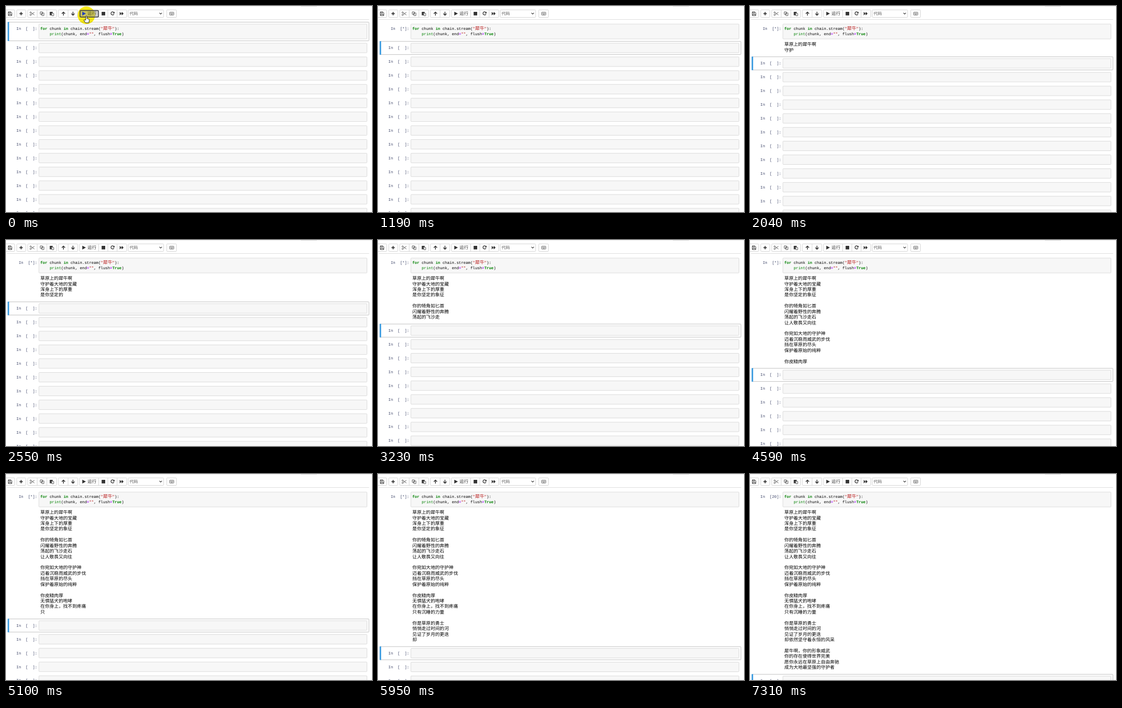
An HTML page that plays this animation: 690x388 px, repeating every 7.82 s.

```html
<!DOCTYPE html>
<html lang="zh-CN">
<head>
<meta charset="utf-8">
<style>
html, body { margin: 0; width: 100%; height: 100%; overflow: hidden; background: #fff; }
svg { display: block; width: 690px; height: 388px; }
text { white-space: pre; text-rendering: geometricPrecision; }
.mono { font: 7.3px "Liberation Mono", monospace; }
.cjk, .out { font-family: "Noto Sans CJK SC", "Noto Sans CJK", sans-serif; }
.out { font-size: 8.6px; }
.prompt { fill: #3c4468; text-anchor: end; }
.input { fill: #f7f7f7; stroke: #d4d4d4; stroke-width: .8; }
.btn { fill: #fff; stroke: #ccc; stroke-width: .8; }
.icon { fill: #333; }
.line { fill: none; stroke: #333; stroke-width: 1; }
.kw { fill: #008000; font-weight: bold; }
.fn { fill: #008000; }
.op { fill: #a2f; font-weight: bold; }
.str { fill: #ba2121; }
</style>
</head>
<body>
<svg viewBox="0 0 690 388">
  <path d="M0 .5H690" stroke="#eee"/>
  <path d="M556 0H586" stroke="#bbb"/>
  <path d="M2 25.4H684.5" stroke="#ddd"/>
  <g id="buttons"></g>

  <g class="line">
    <path d="M4.3 11H9L11 13V18H4.3ZM5.8 11V13.3H8.7V11M5.8 18V15.5H9.5V18" stroke-width=".9"/>
    <path d="M28.5 11.2V17.4M25.4 14.3H31.6" stroke-width="1.7"/>
    <path d="M47.5 12.8L53.6 17M47.5 16L53.6 11.8" stroke="#555" stroke-width=".9"/>
    <g stroke="#555" stroke-width=".9"><circle cx="46.4" cy="12.2" r="1.3"/><circle cx="46.4" cy="16.7" r="1.3"/></g>
    <path d="M64.5 11H68.5V15.5H64.5ZM67.5 13H71.5V18H67.5Z" fill="#fff" stroke-width=".8"/>
    <path d="M108.3 18V11.6M105.2 14.5L108.3 11.4L111.4 14.5M126.3 10.8V17.2M123.2 14.3L126.3 17.4L129.4 14.3" stroke-width="1.4"/>
    <path d="M203.4 12.2A3 3 0 1 0 203.6 15.4" stroke-width="1.3"/>
    <path d="M289.4 13L291.6 15.3L293.8 13" stroke-width="1.1"/>
    <rect x="308.4" y="11.7" width="8" height="5.4" rx=".6" stroke="#555" stroke-width=".8"/>
    <path d="M309.7 13.3H315.2M309.7 14.6H315.2" stroke="#555" stroke-width=".8" stroke-dasharray="1 .5"/>
    <path d="M310.6 15.9H314.3" stroke="#555" stroke-width=".8"/>
  </g>
  <g class="icon">
    <path d="M82.5 11H88V13.3H85.7V17.5H82.5Z"/>
    <path d="M86.3 14H90V18.2H86.3Z" fill="#fff" stroke="#333" stroke-width=".8"/>
    <rect x="180.3" y="11" width="6.7" height="6.7"/>
    <path d="M204.6 10.5V14H201.2Z"/>
    <path d="M214.4 11L218 14.3V11L221.8 14.3L218 17.7V14.3L214.4 17.7Z"/>
  </g>
  <text class="cjk" x="233" y="17.2" font-size="7.8" fill="#555">代码</text>

  <rect id="frame" x="3.4" width="680.8" rx="1" fill="#fff" stroke="#b4b4b4" stroke-width=".8"/>
  <rect id="bar" x="3" width="3" fill="#48a2e2"/>
  <rect class="input" x="62" y="34" width="618.5" height="28" rx="1"/>
  <text id="state" class="mono prompt" x="59" y="45"></text>
  <g class="mono">
    <text x="64.7" y="45"><tspan class="kw">for</tspan> chunk <tspan class="kw">in</tspan> chain.stream(<tspan class="str">"<tspan class="cjk" font-size="8.7">犀牛</tspan>"</tspan>):</text>
    <text x="64.7" y="55.1">    <tspan class="fn">print</tspan>(chunk, end<tspan class="op">=</tspan><tspan class="str">""</tspan>, flush<tspan class="op">=</tspan><tspan class="kw">True</tspan>)</text>
  </g>
  <g id="poem" class="out"></g>
  <g id="cells"></g>

  <circle id="glow" r="16.5" fill="#f8ea18" style="mix-blend-mode:multiply"/>
  <rect id="pressed" x="139.6" y="8.4" width="34.8" height="12.4" rx="2" fill="#999" fill-opacity=".5" stroke="#3c3c46" stroke-width="1.5"/>
  <path id="play" d="M143.8 10.8L150.6 14.3L143.8 17.9Z"/>
  <text id="run" class="cjk" x="153.6" y="17.4" font-size="8.4">运行</text>
  <g id="pointer" fill="#fff" stroke="#111" stroke-width=".9">
    <path id="hand" d="M-1.2 9V2.6Q-1.2 1.2 0 1.2Q1.2 1.2 1.2 2.6V6.2L4.6 7.2Q5.6 7.6 5.6 8.6L4.6 14.2H-1.4L-4.6 9.8Q-4.6 8.2-3.2 8.6Z"/>
    <path id="arrow" d="M0 0V10L2.4 7.8L4 11.4L5.6 10.7L4 7.2H7.2Z"/>
  </g>
</svg>
<script>
const LOOP = 7820, STEP = 170;
const LINE = 10.43, CELL = 25.92;
const poem = `草原上的犀牛啊
守护着大地的宝藏
浑身上下的厚重
是你坚定的象征

你的犄角如匕首
闪耀着野性的奔腾
荡起的飞沙走石
让人敬畏又向往

你宛如大地的守护神
迈着沉稳而威武的步伐
挡在草原的尽头
保护着原始的纯粹

你皮糙肉厚
无惧猛犬的咆哮
在你身上，找不到疼痛
只有沉睡的力量

你是草原的勇士
悄悄走过时间的河
见证了岁月的更迭
却依然坚守着永恒的风采

犀牛啊，你的形象威武
你的存在使得世界完美
愿你永远在草原上自由奔驰
成为大地最坚强的守护者`;
// Each token is one character plus any line breaks before it.
const tokens = poem.match(/\n*[^\n]/g);
// Time in ms and characters written by then.
const pace = [[2040, 9], [2550, 27], [3910, 72], [5100, 115], [5950, 145], [7310, tokens.length]];

const $ = id => document.getElementById(id);
const set = (id, attrs) => {
  for (const k in attrs) $(id).setAttribute(k, attrs[k]);
};
const show = (id, on) => set(id, { display: on ? 'inline' : 'none' });

// Button groups: the x of every edge.
const groups = [[-2, 16.4], [20.3, 37.3], [41, 58.8, 77, 95.3], [98.8, 117, 135.3],
  [138.6, 174.6, 192, 209.4, 227.6], [230.4, 297], [303, 321.4]];
$('buttons').innerHTML = groups.map(g => {
  const w = g[g.length - 1] - g[0];
  return `<rect class="btn" x="${g[0]}" y="7.3" width="${w}" height="14.2" rx="1.2"/>` +
    g.slice(1, -1).map(x => `<path class="btn" d="M${x} 7.3V21.5"/>`).join('');
}).join('');

$('cells').innerHTML = Array.from({ length: 13 }, (_, i) => {
  const y = 70 + i * CELL;
  return `<rect class="input" x="62" y="${y}" width="618.5" height="18" rx="1"/>
    <text class="mono prompt" x="59" y="${y + 11.4}">In  [  ]:</text>`;
}).join('');

const lines = poem.split('\n').map((_, i) => {
  const el = document.createElementNS('http://www.w3.org/2000/svg', 'text');
  el.setAttribute('x', 64.8);
  el.setAttribute('y', 75.1 + i * LINE);
  return $('poem').appendChild(el);
});

function written(t) {
  if (t < pace[0][0]) return 0;
  for (let i = 1; i < pace.length; i++) {
    const [t0, n0] = pace[i - 1], [t1, n1] = pace[i];
    if (t <= t1) return Math.round(n0 + (n1 - n0) * (t - t0) / (t1 - t0));
  }
  return tokens.length;
}

function drawCursor(t) {
  const u = Math.min(1, Math.max(0, (t - 340) / 680));
  const e = u * u * (3 - 2 * u);
  const held = u === 0, visible = t < 1190;
  const transform = `translate(${151.5 - 131.5 * e} ${17.5 + 228.5 * e})`;
  for (const id of ['glow', 'pointer']) {
    set(id, { transform });
    show(id, visible);
  }
  show('hand', held);
  show('arrow', !held);
  show('pressed', held);
  set('play', { fill: held ? '#1f3fc0' : '#333' });
  set('run', { fill: held ? '#55551c' : '#333' });
}

function draw(t) {
  const n = written(t);
  const rows = n ? tokens.slice(0, n).join('').split('\n') : [];
  lines.forEach((el, i) => { el.textContent = rows[i] || ''; });
  const shift = n ? 8.2 + rows.length * LINE : 0;
  set('cells', { transform: `translate(0 ${shift})` });

  const running = t >= STEP;
  const y = running ? 66.6 + shift : 30.4, height = running ? 24.8 : 35.2;
  set('frame', { y, height });
  set('bar', { y: y - .4, height: height + .8 });
  $('state').textContent = `In  [${!running ? '  ' : t < 7310 ? '*' : '20'}]:`;
  drawCursor(t);
}

const start = performance.now();
function tick() {
  const t = (performance.now() - start) % LOOP;
  draw(Math.floor(t / STEP) * STEP);
  requestAnimationFrame(tick);
}
tick();
</script>
</body>
</html>
```
